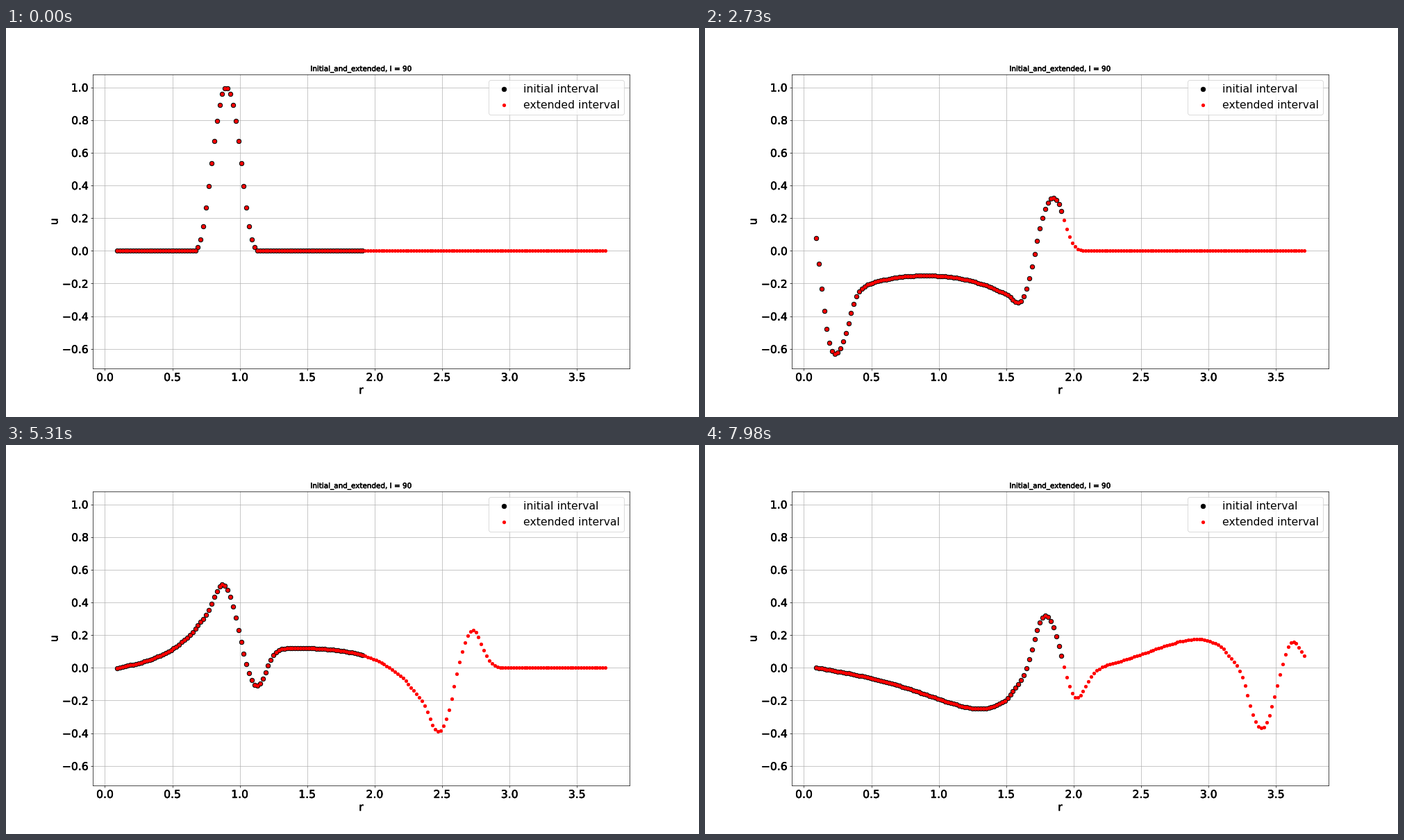
A matplotlib script that plays this animation: 998x561 px, repeating every 8000 ms.

```python
import numpy as np
import matplotlib.pyplot as plt
from matplotlib import patheffects
from matplotlib.animation import FuncAnimation

DPI = 62.375
LOOP_MS = 8000
FRAMES = 267

# Grid of cell centres, one ghost cell on the left of r = 0.1
H, DT, MASS = 0.02, 0.01, 3.0
SHORT, LONG, CELLS = 92, 182, 225
r = 0.09 + H * np.arange(CELLS)


def bump(x, half=0.3):
    """Smooth hump of height 1 that vanishes outside |x| < half."""
    q = np.clip((x / half) ** 2, 0, 1 - 1e-9)
    return np.exp(-4 * q / (1 - q))


def accel(u):
    """Right side of u_tt = u_rr - MASS^2 u."""
    a = np.zeros_like(u)
    a[1:-1] = (u[2:] - 2 * u[1:-1] + u[:-2]) / H**2 - MASS**2 * u[1:-1]
    return a


def clamp(u):
    """Zero value at the inner wall, halfway between the first two nodes."""
    u[0] = -u[1]
    return u


def solve(steps):
    u0 = bump(r - 0.9)
    u1 = clamp(u0 + 0.5 * DT**2 * accel(u0))
    rows = [u0, u1]
    while len(rows) < steps:
        rows.append(clamp(2 * rows[-1] - rows[-2] + DT**2 * accel(rows[-1])))
    return np.array(rows)


waves = solve(FRAMES)

plt.rcParams.update({"font.family": "DejaVu Sans", "font.size": 18})
fig = plt.figure(figsize=(16, 8.994), dpi=DPI, facecolor="white")
ax = fig.add_axes([0.125, 0.125, 0.775, 0.755])
ax.set_xlim(-0.091, 3.891)
ax.set_ylim(-0.719, 1.0772)
ax.set_xticks(np.arange(0, 3.6, 0.5))
ax.set_yticks(np.arange(-3, 6) * 0.2)
ax.grid(True)

title = ax.set_title("Initial_and_extended, I = 90", fontsize=12)
xlabel = ax.set_xlabel("r")
ylabel = ax.set_ylabel("u")
heavy = [patheffects.withStroke(linewidth=0.6, foreground="black")]
for text in [title, xlabel, ylabel, *ax.get_xticklabels(), *ax.get_yticklabels()]:
    text.set_path_effects(heavy)

inner, = ax.plot([], [], "o", color="black", ms=7.5, label="initial interval")
outer, = ax.plot([], [], "o", color="red", ms=5, label="extended interval")
ax.legend(loc="upper right", fontsize=18)


def update(i):
    inner.set_data(r[:SHORT], waves[i, :SHORT])
    outer.set_data(r[:LONG], waves[i, :LONG])
    return inner, outer


anim = FuncAnimation(fig, update, frames=FRAMES, interval=LOOP_MS / FRAMES,
                     init_func=lambda: update(0), repeat=True, repeat_delay=0)
plt.show()
```
